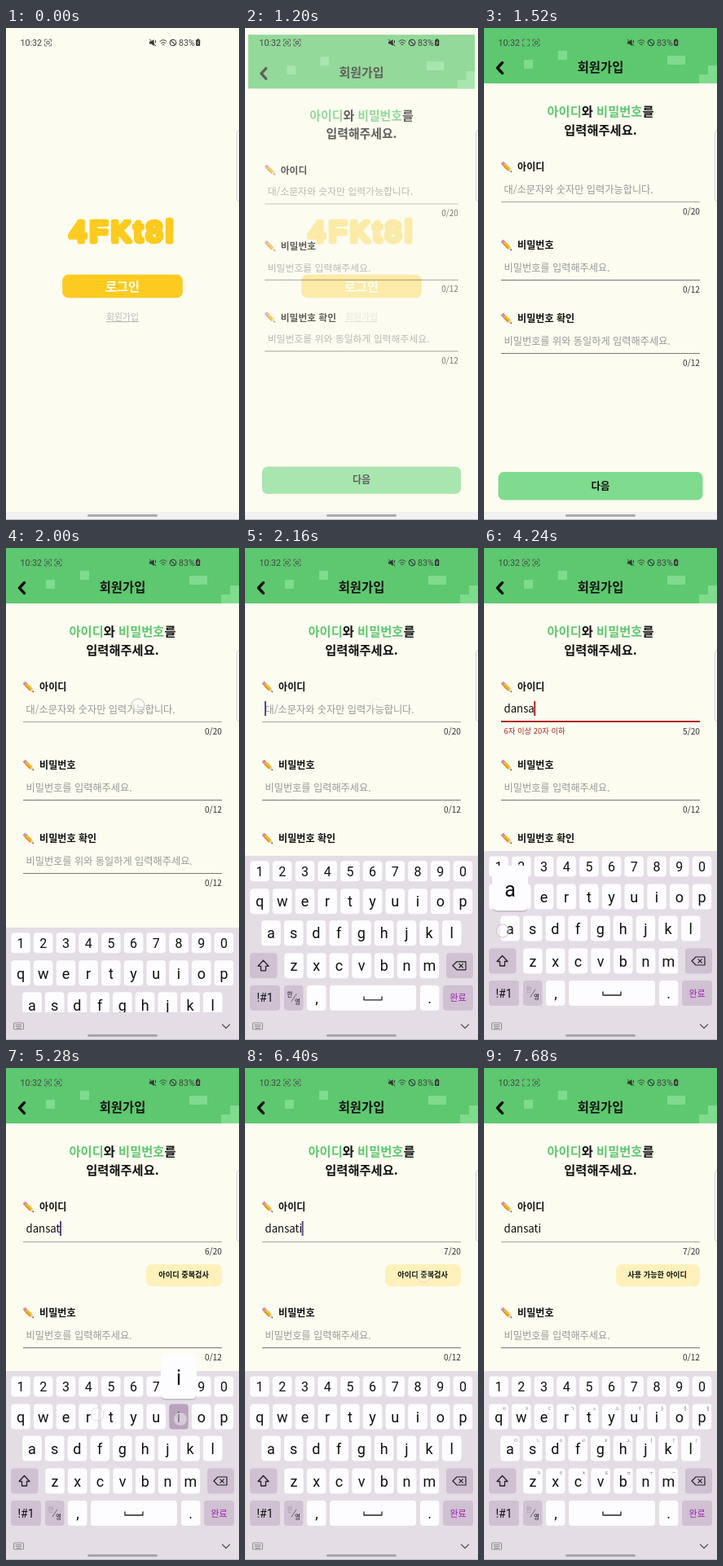
Animation, 286 px wide and 604 px high, one loop 8 s. Source, as an HTML page:

```html
<!DOCTYPE html>
<html lang="ko">
<head>
<meta charset="utf-8">
<style>
  html, body { margin: 0; width: 100%; height: 100%; overflow: hidden; background: #fcfcf0; }
  svg { display: block; width: 286px; height: 604px; }
  text { font-family: 'Noto Sans CJK KR', 'Noto Sans CJK', 'Noto Sans', sans-serif; white-space: pre; }
  .latin { font-family: Roboto, sans-serif; }
  .logo { font-family: 'Liberation Sans', sans-serif; letter-spacing: 5px; }
</style>
</head>
<body>
<svg id="stage" viewBox="0 0 286 604"></svg>
<script>
const LOOP = 8000;
const WORD = 'dansati';
const INK = '#101010', YELLOW = '#fdcb1f', GREEN = '#5dc86f', MINT = '#7fdb8e', CREAM = '#fcfcf0';

// Markup helpers; text is centred vertically on y
const text = (x, y, size, body, { fill = INK, weight = 400, anchor = 'start', attrs = '' } = {}) =>
  `<text x="${x}" y="${y + size * 0.37}" font-size="${size}" fill="${fill}" font-weight="${weight}" text-anchor="${anchor}" ${attrs}>${body}</text>`;
const mid = (x, y, size, body, opts = {}) => text(x, y, size, body, { anchor: 'middle', ...opts });
const rect = (x, y, w, h, fill, r = 0, attrs = '') =>
  `<rect x="${x}" y="${y}" width="${w}" height="${h}" rx="${r}" fill="${fill}" ${attrs}/>`;
const line = (d, color = INK, width = 1) =>
  `<path d="${d}" fill="none" stroke="${color}" stroke-width="${width}" stroke-linecap="round" stroke-linejoin="round"/>`;
const latin = 'class="latin"';

const navBar = rect(0, 594, 286, 10, '#f2f2f2') + rect(100, 597, 86, 3, '#aaa', 1.5);

const login = rect(0, 0, 286, 604, CREAM)
  + mid(144, 249, 35, '4FKt8l', { fill: YELLOW,
      attrs: `class="logo" stroke="${YELLOW}" stroke-width="6.5" stroke-linejoin="round"` })
  + rect(69.5, 303, 147, 28, YELLOW, 7, 'stroke="#f3c32a" stroke-width=".6"')
  + mid(143, 317, 15.2, '로그인', { fill: '#fff', weight: 700 })
  + mid(143, 355, 10.9, '회원가입', { fill: '#bbb', weight: 500, attrs: 'text-decoration="underline"' });

const pencil = y => `<g transform="translate(28 ${y}) rotate(45)">`
  + rect(-8.5, -2.2, 3, 4.4, '#ea8798', 1) + rect(-6, -2.2, 1.6, 4.4, '#9aa4ab')
  + rect(-4.4, -2.2, 8.4, 4.4, '#f7b52c') + rect(-4.4, 0.8, 8.4, 1.4, '#d98e1c')
  + `<path d="M4-2.2L8.5 0L4 2.2z" fill="#f0cfa0"/><path d="M6.8-.9L8.7 0L6.8.9z" fill="#333"/></g>`;

const field = (y, label, hint, hintId = '') => pencil(y)
  + text(41, y, 12.1, label, { weight: 700 })
  + text(24.5, y + 27, 12.2, hint, { fill: '#999', weight: 500, attrs: hintId });
const passwordField = (y, label, hint) => field(y, label, hint)
  + rect(21, y + 42, 244, 1, '#777')
  + text(265, y + 54, 10.2, '0/12', { fill: '#333', anchor: 'end' });

const heading = (y, body) => mid(143, y, 15.3, body, { weight: 900 });
const green = s => `<tspan fill="${GREEN}">${s}</tspan>`;

const signup = rect(0, 0, 286, 604, CREAM) + rect(0, 0, 286, 68, GREEN)
  + [[49, 39, 11], [91, 28, 11], [225, 34, 22], [264, 57, 22], [275, 46, 11]]
      .map(([x, y, w]) => rect(x, y, w, 11, MINT)).join('')
  + line('M22.5 42.5L16.5 49L22.5 55.5', '#111', 3.4)
  + mid(143, 48, 15.4, '회원가입', { weight: 900 })
  + heading(102, `${green('아이디')}와 ${green('비밀번호')}를`) + heading(125, '입력해주세요.')
  + field(171, '아이디', '대/소문자와 숫자만 입력가능합니다.', 'id="hint"')
  + text(24.5, 197.5, 13.2, '', { attrs: 'id="typed"' })
  + rect(24, 188, 2, 18, INK, 0, 'id="caret"')
  + rect(21, 213, 244, 1, '#aaa', 0, 'id="rule"')
  + text(24.5, 225, 9.4, '6자 이상 20자 이하', { fill: '#b02525', weight: 500, attrs: 'id="error"' })
  + text(265, 225, 10.2, '0/20', { fill: '#333', anchor: 'end', attrs: 'id="count"' })
  + `<g id="check">${rect(172, 241, 93, 27, '#fff1bb', 7, 'id="checkBox"')}`
  + `${text(249, 254, 9.2, '', { weight: 700, anchor: 'end', attrs: 'id="checkText"' })}</g>`
  + `<g id="passwords">${passwordField(267, '비밀번호', '비밀번호를 입력해주세요.')}`
  + `${passwordField(357, '비밀번호 확인', '비밀번호를 위와 동일하게 입력해주세요.')}</g>`
  + rect(17.5, 545, 251, 34.5, MINT, 7) + mid(143, 562, 12.4, '다음', { weight: 700 });

// Keyboard
const PITCH = 27.72, KEY = '#fdfcfe', DARK_KEY = '#cfc0d2', BOARD = '#e4dde5';
const keyAt = {};
let keys = '', jamo = '';
[['1234567890', 18, 391, 25, ''],
 ['qwertyuiop', 18, 428, 31, 'ㅂㅈㄷㄱㅅㅛㅕㅑㅐㅔ'],
 ['asdfghjkl', 32, 467, 31, 'ㅁㄴㅇㄹㅎㅗㅓㅏㅣ'],
 ['zxcvbnm', 60, 507, 31, 'ㅋㅌㅊㅍㅠㅜㅡ']].forEach(([row, x0, y, h, marks]) => {
  [...row].forEach((c, i) => {
    const x = x0 + i * PITCH;
    keyAt[c] = { x, y };
    keys += rect(x - 11.8, y - h / 2, 23.6, h, KEY, 4, `id="key-${c}"`)
      + mid(x, y, h < 30 ? 16 : 18, c, { attrs: latin });
    if (marks) jamo += mid(x + 7, y - 10, 5.5, marks[i], { fill: '#777' });
  });
});
const wideKey = (x, y, w, fill) => rect(x, y - 15.5, w, 31, fill, 4);
const keyboard = rect(0, 372, 286, 240, BOARD) + keys
  + wideKey(6, 507, 33.5, DARK_KEY) + line('M22.5 500.5L29 507.5H25.5V513H19.5V507.5H16z', '#222', 1.3)
  + wideKey(247, 507, 33, DARK_KEY) + line('M260 502H271V512H260L255 507zM263 504.8L267.4 509.2M267.4 504.8L263 509.2', '#222', 1.2)
  + wideKey(6, 546.5, 37, DARK_KEY) + mid(24.5, 546.5, 14, '!#1', { attrs: latin })
  + wideKey(48, 546.5, 23.5, DARK_KEY) + mid(55, 542, 7.5, '한', { attrs: 'id="hangul"' })
  + line('M57 551L63 542', '#555', 0.8) + mid(64.5, 551, 7.5, '영')
  + wideKey(76, 546.5, 23.5, KEY) + mid(88, 546.5, 18, ',', { attrs: latin })
  + wideKey(104, 546.5, 106, KEY) + line('M146 545V549H168V545', '#222', 1.3)
  + wideKey(215, 546.5, 23.5, KEY) + mid(226.5, 546.5, 18, '.', { attrs: latin })
  + wideKey(243, 546.5, 37, DARK_KEY) + mid(261.5, 546.5, 11, '완료', { fill: '#a020b0' })
  + `<g id="jamo">${jamo}</g>`;
const keyboardFooter = rect(0, 570, 286, 34, BOARD)
  + rect(9.5, 583, 12, 8, 'none', 1, 'stroke="#777" stroke-width=".8"')
  + line('M12 585.5H19M12 587.5H19M13 589.5H18', '#777', 0.8)
  + line('M265.5 585L270 589.5L274.5 585', '#555', 1.2) + rect(100, 597, 86, 3, '#a9a4ab', 1.5);

const popup = `<g id="popup">${rect(-22, -76, 44, 56, '#000', 6, 'opacity=".12"')}`
  + `${rect(-22, -77, 44, 55, KEY, 6)}${mid(0, -48, 25, '', { attrs: 'class="latin" id="popupText"' })}</g>`;

// Status bar
const frameIcon = x => line(`M${x} 16.5V14H${x + 2.5}M${x + 5.5} 14H${x + 8}V16.5M${x + 8} 19.5V22H${x + 5.5}M${x + 2.5} 22H${x}V19.5`, '#555', 0.8);
const dot = (x, id = '') => `<circle cx="${x}" cy="18" r="1.8" fill="none" stroke="#444" ${id}/>`;
const status = text(17.5, 18, 10.7, '10:32', { fill: '#444', attrs: latin })
  + frameIcon(47.5) + dot(51.5, 'id="dot"')
  + `<g id="secondIcon">${frameIcon(60)}${dot(64)}</g>`
  + '<path d="M176 16.4H178.3L181.6 14V22L178.3 19.6H176z" fill="#333"/>' + line('M176.5 14L184 22M183.5 15.5V18', '#333', 1)
  + line('M188.8 16.5Q193 12.6 197.2 16.5M190.4 18.6Q193 16.2 195.6 18.6M191.9 20.5Q193 19.5 194.1 20.5', '#444', 1)
  + '<circle cx="205" cy="18" r="3.8" fill="none" stroke="#333" stroke-width="1.1"/>' + line('M202.4 15.4L207.6 20.6', '#333', 1.1)
  + text(212, 18, 10.7, '83%', { fill: '#444', attrs: latin })
  + rect(233.2, 14.3, 5, 7.7, '#333', 1) + rect(234.7, 13.3, 2, 1.5, '#333') + line('M236.2 16L235.1 18.3H236.5L235.4 20.4', '#eee', 0.7);

const edgeHandle = rect(283.5, 126, 8, 87, '#fdfdfb', 3, 'stroke="#c4c4c0" stroke-width=".8"');
const bottomEdge = rect(0, 603, 286, 1, '#bcbcc0');

document.getElementById('stage').innerHTML = login
  + `<g id="signup">${signup}</g>${navBar}<g id="keyboard">${keyboard}</g><g id="footer">${keyboardFooter}</g>`
  + popup + status + edgeHandle + bottomEdge
  + '<g id="touches"></g>';

const el = {};
document.querySelectorAll('[id]').forEach(node => el[node.id] = node);
const show = (node, on) => node.setAttribute('visibility', on ? 'inherit' : 'hidden');
const set = (node, attrs) => { for (const k in attrs) node.setAttribute(k, attrs[k]); };
const clamp = v => Math.max(0, Math.min(1, v));

// Timeline
const PRESS = 60, COMMIT = 120, RELEASE = 200, TOUCH_FADE = 320;
const downs = [2880, 3170, 3520, 3800, 4100, 5060, 5200];
const strokes = downs.map((at, i) => ({ at, char: WORD[i], ...keyAt[WORD[i]] }));
const touchSpots = { 1: [32, 462], 4: [23, 470], 5: [112, 425], 6: [214, 431] };
const touches = [[820, 143, 357], [1880, 162, 193], [6160, 219, 255],
  ...strokes.map((s, i) => [s.at, ...(touchSpots[i] || [s.x, s.y])])];
const FOCUS = 2060, BLUR = 6840, CHECKED = 6600;

function draw(t) {
  const enter = 1 - (1 - clamp((t - 1080) / 400)) ** 3;
  const scale = 0.92 + 0.08 * enter;
  set(el.signup, { opacity: enter, transform: `translate(143 302) scale(${scale}) translate(-143 -302)` });

  const rise = 1 - (1 - clamp((t - 1920) / 400)) ** 4;
  show(el.keyboard, rise > 0);
  show(el.footer, rise > 0.2);
  set(el.keyboard, { transform: `translate(0 ${232 * (1 - rise)})` });
  set(el.hangul, { fill: t < 2400 ? INK : '#999' });
  show(el.jamo, t >= 7440);

  const committed = strokes.filter(s => t >= s.at + COMMIT);
  const n = committed.length, short = n > 0 && n < 6, enough = n >= 6;
  el.typed.textContent = WORD.slice(0, n);
  el.count.textContent = `${n}/20`;
  show(el.hint, n === 0);
  show(el.error, short);
  set(el.rule, { height: short ? 2 : 1, y: short ? 212 : 213, fill: short ? '#b02525' : '#a5a5a0' });

  const lastEdit = n ? committed[n - 1].at + COMMIT : FOCUS;
  show(el.caret, t >= FOCUS && t < BLUR && (t - lastEdit) % 1000 < 500);
  set(el.caret, { x: 24 + (n ? el.typed.getComputedTextLength() : 0), fill: short ? '#b02525' : '#5f4488' });

  const done = t >= CHECKED;
  show(el.check, enough);
  set(el.checkBox, done ? { x: 162, width: 103 } : { x: 172, width: 93 });
  el.checkText.textContent = done ? '사용 가능한 아이디' : '아이디 중복검사';
  set(el.passwords, { transform: `translate(0 ${enough ? 34 : 0})` });

  const pressed = strokes.filter(s => t >= s.at + PRESS && t < s.at + RELEASE).pop();
  show(el.popup, !!pressed);
  if (pressed) {
    set(el.popup, { transform: `translate(${Math.max(31, pressed.x)} ${pressed.y})` });
    el.popupText.textContent = pressed.char;
  }
  for (const c of new Set(WORD)) {
    const held = pressed && pressed.char === c && t < pressed.at + COMMIT;
    set(el['key-' + c], { fill: held ? '#b9a2be' : KEY });
  }

  el.touches.innerHTML = touches.filter(([at]) => t >= at && t < at + TOUCH_FADE).map(([at, x, y]) => {
    const alpha = 1 - clamp((t - at - 100) / (TOUCH_FADE - 100));
    return `<circle cx="${x}" cy="${y}" r="8" fill="#fff" fill-opacity=".45" stroke="#bbb" opacity="${alpha}"/>`;
  }).join('');

  show(el.dot, t % 1000 < 500);
  show(el.secondIcon, t >= 400);
}

const start = performance.now();
function tick() {
  draw((performance.now() - start) % LOOP);
  requestAnimationFrame(tick);
}
tick();
</script>
</body>
</html>
```
